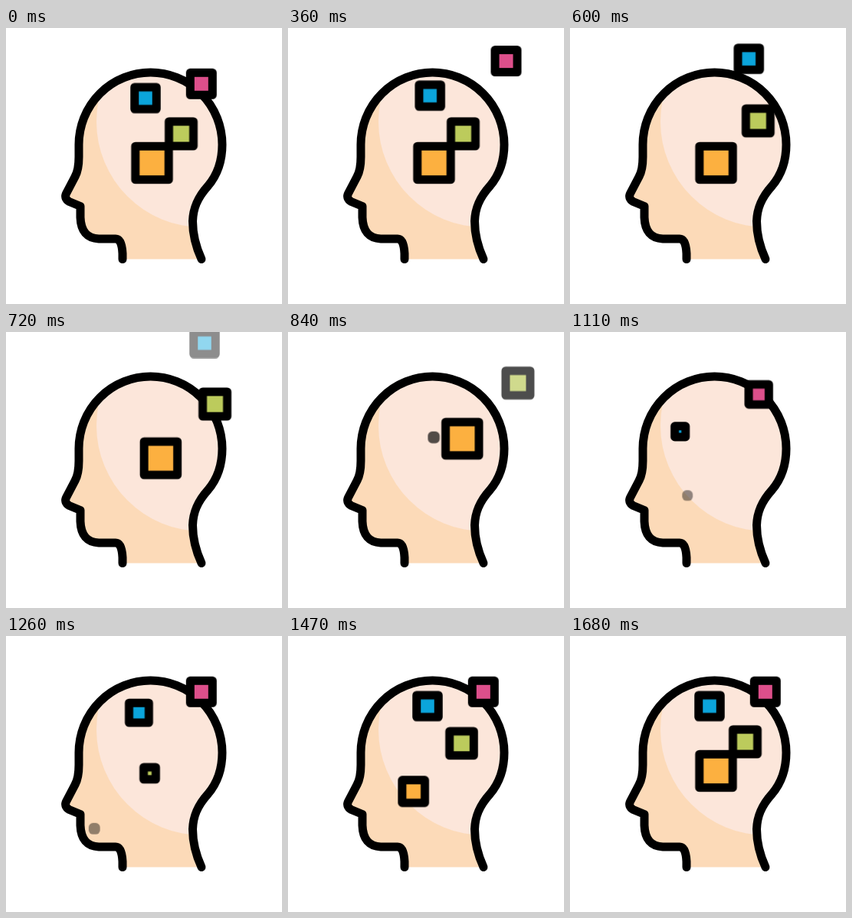
These frames come from a looping animation (360x360 px, 1800 ms). An HTML page:

```html
<!DOCTYPE html>
<html lang="en">
<head>
<meta charset="utf-8">
<title>Head with drifting squares</title>
<style>
html, body { margin: 0; width: 100%; height: 100%; overflow: hidden; background: #fff; }
svg { display: block; width: 100vw; height: 100vh; }
.line { fill: none; stroke: #000; stroke-width: 11; stroke-linecap: round; stroke-linejoin: round; }

.tile {
  --ease: cubic-bezier(.3333, 0, .6667, 1);
  --delay: calc(var(--i) * 150ms);
  --fade: fade;
  animation: leave 1800ms var(--ease) var(--delay) infinite,
             var(--fade) 1800ms linear var(--delay) infinite;
}
.tile rect {
  stroke: #000; stroke-width: 11; stroke-linejoin: round;
  vector-effect: non-scaling-stroke;
  animation: arrive 1800ms var(--ease) var(--delay) infinite,
             grow 1800ms var(--ease) var(--delay) infinite;
}

/* Each tile drifts off up-right, fades, then grows back in from down-left. */
@keyframes leave {
  0%, 8.22% { translate: 0px 0px; }
  38.78% { translate: 89px -89px; }
  38.79%, 100% { translate: 0px 0px; }
}
@keyframes arrive {
  0%, 37.2% { translate: 0px 0px; }
  37.21% { translate: calc(var(--d) * -1) var(--d); }
  67.78%, 100% { translate: 0px 0px; }
}
@keyframes grow {
  0%, 37.2% { scale: 1; }
  37.21%, 40.28% { scale: 0; }
  66.67%, 100% { scale: 1; }
}
@keyframes fade {
  0%, 28.06% { opacity: 1; }
  34.72%, 42.2% { opacity: 0; }
  48.9%, 100% { opacity: 1; }
}
@keyframes fade-early {
  0%, 21.67% { opacity: 1; }
  28.06%, 42.2% { opacity: 0; }
  48.9%, 100% { opacity: 1; }
}
</style>
</head>
<body>
<svg viewBox="0 0 360 360">
  <defs>
    <path id="head" d="M152 301.500V294Q151 275 143 275H121Q98 274 97 247V232.500L82.500 226.500Q75 222 79 215L90 194Q95 185 95 168V152A93.500 94 0 0 1 282 152C282 176 274.500 193 263.500 206C249 222 244 236 243.500 252C243.500 270 247 284 255 301.500"/>
    <clipPath id="inside"><use href="#head"/></clipPath>
  </defs>
  <use href="#head" fill="#fcdab8"/>
  <circle cx="256" cy="122" r="138" fill="#fce6da" clip-path="url(#inside)"/>
  <use href="#head" class="line"/>

  <g transform="translate(190.5 176)">
    <g class="tile" style="--i:3; --d:90px"><rect x="-21.75" y="-21.75" width="43.5" height="43.5" fill="#fcb040"/></g>
  </g>
  <g transform="translate(228.5 138)">
    <g class="tile" style="--i:2; --d:90px"><rect x="-16" y="-16" width="32" height="32" fill="#bccb5c"/></g>
  </g>
  <g transform="translate(182 91.5)">
    <g class="tile" style="--i:1; --d:84px"><rect x="-14.25" y="-14.25" width="28.5" height="28.5" fill="#0ba5dc"/></g>
  </g>
  <g transform="translate(254.8 72.8)">
    <g class="tile" style="--i:0; --d:84px; --fade:fade-early"><rect x="-14.5" y="-14.5" width="29" height="29" fill="#dd4f8b"/></g>
  </g>
</svg>
</body>
</html>
```
